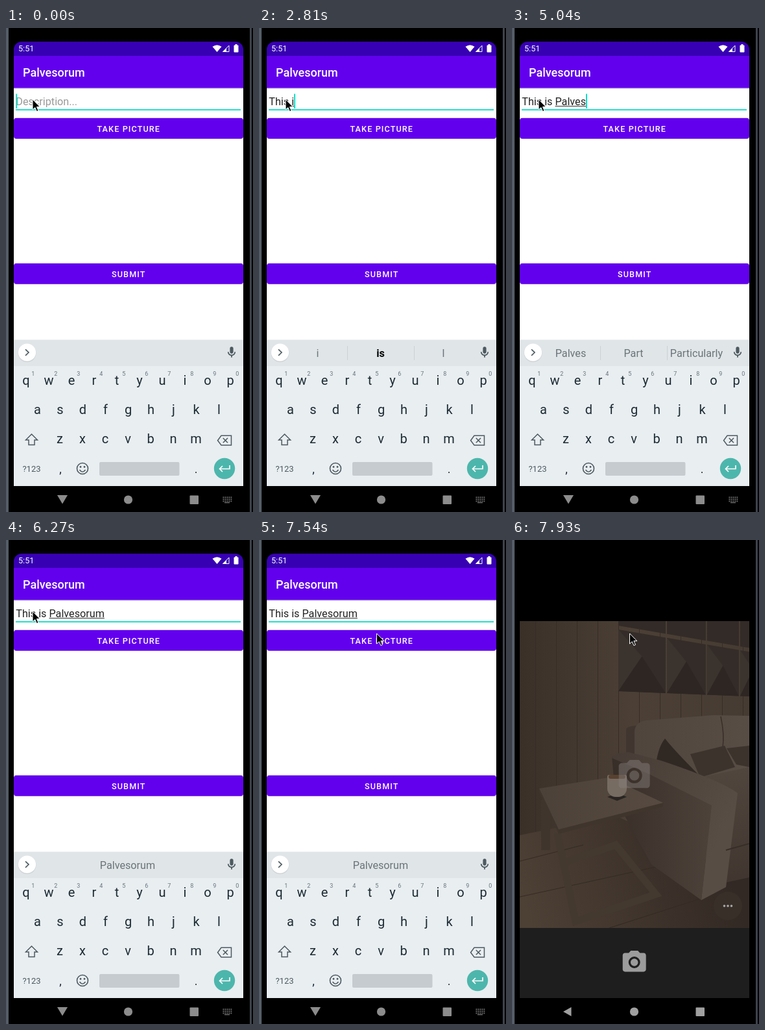
An HTML page with a canvas that plays this animation: 381x746 px, repeating every 8000 ms.

```html
<!DOCTYPE html>
<html lang="en">
<head>
<meta charset="utf-8">
<title>Phone typing</title>
<style>
html, body { margin: 0; height: 100%; overflow: hidden; background: #000; }
canvas { display: block; }
</style>
</head>
<body>
<canvas id="stage" width="381" height="746"></canvas>
<script>
const ctx = document.getElementById('stage').getContext('2d');
const LOOP = 8000, BLINK = 530;
const NAME = 'Palvesorum', SENTENCE = 'This is ' + NAME;

// When each letter of the sentence appears
const keyTimes = [1060, 1210, 1610, 1740, 1880, 2810, 2960, 2960, 3540, 3740, 3940, 4370, 4640, 5040, 5290, 5430, 5570, 5710];
const completions = { T: ['The', 'Thanks'], i: ['*is', 'I'], P: ['Part', 'Particularly'] };

const CAMERA = new Path2D('M9 2L7.17 4H4c-1.1 0-2 .9-2 2v12c0 1.1.9 2 2 2h16c1.1 0 2-.9 2-2V6c0-1.1-.9-2-2-2h-3.17L15 2zM12 17a5 5 0 1 1 0-10 5 5 0 1 1 0 10zM12 15.2a3.2 3.2 0 1 0 0-6.4 3.2 3.2 0 1 0 0 6.4z');
const MIC = new Path2D('M12 14c1.66 0 3-1.34 3-3V5a3 3 0 0 0-6 0v6c0 1.66 1.34 3 3 3zM17 11a5 5 0 0 1-10 0H5c0 3.5 2.6 6.4 6 6.9V21h2v-3.1c3.4-.5 6-3.4 6-6.9z');
const POINTER = new Path2D('M0 0V16L3.8 12.6 6.4 18.6 9 17.5 6.4 11.6H11.3Z');

function rect(x, y, w, h, color, radius = 0) {
  ctx.fillStyle = color;
  ctx.beginPath();
  ctx.roundRect(x, y, w, h, radius);
  ctx.fill();
}
function circle(x, y, r, color) {
  ctx.fillStyle = color;
  ctx.beginPath();
  ctx.arc(x, y, r, 0, 7);
  ctx.fill();
}
function shape(d, color) {
  ctx.fillStyle = color;
  ctx.fill(new Path2D(d));
}
function line(d, color, width = 1.6) {
  ctx.strokeStyle = color;
  ctx.lineWidth = width;
  ctx.stroke(new Path2D(d));
}
function fade(x0, y0, x1, y1, ...colors) {
  const gradient = ctx.createLinearGradient(x0, y0, x1, y1);
  colors.forEach((color, i) => gradient.addColorStop(i / (colors.length - 1), color));
  return gradient;
}
function icon(path, x, y, scale, color) {
  ctx.save();
  ctx.translate(x, y);
  ctx.scale(scale, scale);
  ctx.translate(-12, -12);
  ctx.fillStyle = color;
  ctx.fill(path, 'evenodd');
  ctx.restore();
}
function text(str, x, y, size, color, align = 'center', weight = 400, spacing = 0) {
  ctx.font = `${weight} ${size}px Roboto, sans-serif`;
  ctx.letterSpacing = spacing + 'px';
  ctx.textAlign = align;
  ctx.fillStyle = color;
  ctx.fillText(str, x, y);
}
function clipped(x, y, w, h, radius, paint) {
  ctx.save();
  ctx.beginPath();
  ctx.roundRect(x, y, w, h, radius);
  ctx.clip();
  paint();
  ctx.restore();
}

function button(label, y) {
  rect(12, y, 354, 32, '#6200ee', 4);
  text(label, 189.3, y + 21, 12.6, '#fff', 'center', 500, 1.125);
}

function suggest(typed, word) {
  if (!typed) return [];
  if (!word) return ['will', 'is', 'was'];
  return word.length > 6 ? [word] : [word, ...completions[word[0]]];
}

function suggestions(words) {
  const middle = (words.length - 1) / 2;
  words.forEach((word, i) => {
    const bold = word[0] == '*';
    text(word.replace('*', ''), 187.5 + 97 * (i - middle), 507, 16.2, bold ? '#000' : '#6a7478', 'center', bold ? 700 : 400);
    if (i) rect(39 + 97 * i + (i - 1) * 6, 490, 1, 22, '#ccd1d4');
  });
}

function keyRow(keys, x, y) {
  [...keys].forEach((key, i) => text(key, x + 35 * i, y, 20, '#1c2b33'));
}

function keyboard(words) {
  const ink = '#1c2b33', gray = '#4c5a60';
  rect(12, 480.5, 354, 41, '#e0e5e8');
  rect(12, 521, 354, 185, '#e9eef1');
  circle(32.5, 501, 14, '#cfd4d7');
  circle(32.5, 500, 13.6, '#fff');
  line('M30 495.3L35 500.1 30 504.9', gray);
  suggestions(words);
  icon(MIC, 348, 500, .87, gray);
  keyRow('qwertyuiop', 31, 549.5);
  keyRow('asdfghjkl', 48.5, 595);
  keyRow('zxcvbnm', 83, 640);
  for (let i = 0; i < 10; i++) text((i + 1) % 10, 41.8 + 35 * i, 535.5, 9, '#66747a');
  line('M39.5 626L30.5 635H35V642.5H44V635H48.5Z', gray, 1.5);
  line('M332 628.3H347.5V643H332L326.5 635.7ZM334.8 632L342 639.3M342 632L334.8 639.3', gray, 1.5);
  text('?123', 39.5, 683.7, 13, gray);
  text(',', 84, 685.5, 18, ink);
  text('.', 293, 685.5, 18, ink);
  line('M126.5 679a8.5 8.5 0 1 1-17 0a8.5 8.5 0 1 1 17 0M113.5 681Q118 687 122.5 681', gray);
  circle(115, 676.5, 1.4, gray);
  circle(121, 676.5, 1.4, gray);
  rect(144, 669, 123.5, 21, '#c6cbcf', 2);
  circle(337, 679, 16.2, '#4db6ac');
  line('M345 674V679.5H330M334 675L329.5 679.5 334 684', '#fff', 1.7);
}

function navigation(color, back) {
  shape(back ? 'M79 727L91.5 720V734Z' : 'M79 720H95L87 733.5Z', color);
  circle(188.5, 727, 6.6, color);
  rect(283.5, 720.5, 13.5, 13.5, color, 1);
  if (back) return;
  for (let i = 0; i < 15; i++) rect(334.5 + i % 5 * 3, 722.5 + (i / 5 | 0) * 3, 1.8, 1.8, '#777');
  rect(337, 731, 8, 1.2, '#777');
}

function statusBar() {
  rect(12, 21, 354, 22, '#3700b3', [12, 12, 0, 0]);
  text('5:51', 19, 36.3, 12.6, '#fff', 'left');
  shape('M325.5 37L318.5 28.8Q325.5 23.5 332.5 28.8ZM334 37L340 31V37Z', '#fff');
  line('M334.5 36.5H344V27Z', '#fff', 1);
  rect(351.5, 26.5, 7, 11, '#fff', 1);
  rect(353.5, 25, 3, 2, '#fff');
}

function form(t) {
  const count = keyTimes.filter(at => at <= t).length;
  const typed = SENTENCE.slice(0, count), word = typed.split(' ').pop();
  const lastKey = count ? keyTimes[count - 1] : -250;

  rect(12, 92, 354, 389, '#fff');
  rect(12, 92, 354, 2, '#ddd');
  rect(12, 42, 354, 50.6, '#6200ee');
  statusBar();
  text(NAME, 26, 75, 18, '#fff', 'left', 500);

  text(typed || 'Description...', 15.3, 119, 16.2, typed ? '#222' : '#999', 'left');
  const width = ctx.measureText(typed).width, marked = ctx.measureText(word).width;
  rect(15.3 + width - marked, 120, marked, 1, '#333');
  rect(15, 125.3, 347, 1.8, '#03dac5');
  if (Math.floor((t - lastKey) / BLINK) % 2 == 0) rect(15.3 + width, 101.5, 1.9, 22.5, '#03dac5');
  button('TAKE PICTURE', 138.7);
  button('SUBMIT', 362.7);
  keyboard(suggest(typed, word));
  navigation('#8c8c8c');
}

function launching() {
  clipped(12, 21, 354, 700, [12, 12, 0, 0], () => {
    rect(12, 21, 354, 700, '#1d1d1d');
    ctx.translate(189, 388);
    ctx.scale(1.05, 1.05);
    ctx.translate(-189, -388);
    keyboard([NAME]);
    rect(0, 0, 381, 746, 'rgba(29,29,29,.6)');
    rect(0, 690, 381, 56, 'rgba(0,0,0,.16)');
  });
  icon(CAMERA, 188.7, 363, 2.4, '#6b6d6e');
  navigation('#a0a0a0', true);
}

function wallTiles() {
  const top = x => 138 + (x - 164) * .17, bottom = x => 233 + (x - 164) * .04;
  for (let x = 164, w = 73; x < 366; x += w + 2, w *= .82) {
    const r = x + w, mid = `${x + w / 2} ${(top(x) + bottom(x)) / 2 - 6}`;
    shape(`M${x} 120H${r}V${top(r) - 6}L${x} ${top(x) - 6}Z`, '#332b27');
    shape(`M${x} ${top(x)}L${r} ${top(r)}V${bottom(r)}L${x} ${bottom(x)}Z`, '#342c28');
    shape(`M${x} ${top(x)}L${mid} ${x} ${bottom(x)}Z`, '#3b332d');
    shape(`M${x} ${bottom(x)}L${mid} ${r} ${bottom(r)}Z`, '#2d2623');
  }
}

function room() {
  rect(12, 125, 354, 473, fade(12, 0, 366, 0, '#3a3028', '#4c4036', '#463b32'));
  for (let x = 36; x < 366; x += 32) rect(x, 125, 1, 330, '#372d26');
  shape('M12 455L160 425 366 520V598H12Z', fade(30, 598, 330, 500, '#4d4035', '#332924'));
  line('M12 495L110 470M12 550L240 500M150 598L290 553', '#352b24', 1.2);
  wallTiles();
  // sofa
  shape('M176 292Q176 287 194 286V345L176 335Z', '#40362f');
  shape('M189 350V294Q191 280 208 278L310 270 366 271V380Z', fade(190, 0, 366, 0, '#4f453d', '#584d45'));
  line('M322 272Q328 300 325 320', '#3a3029');
  shape('M290 366L366 350V520L320 530Z', fade(0, 350, 0, 530, '#51463e', '#40362f'));
  shape('M236 306Q250 324 290 364L222 345Q226 318 236 306Z', '#302823');
  shape('M275 330L328 317 344 350 290 366ZM331 321L366 317V350L346 346Z', '#3c332d');
  shape('M154 334L215 360 308 407 292 555 215 500 160 400Z', fade(154, 0, 308, 0, '#382e28', '#4d423a'));
  shape('M154 336Q156 327 180 327L230 340Q320 370 348 390L330 535 292 555 308 409 210 360Z', fade(160, 330, 340, 420, '#473c35', '#584d44'));
  line('M330 478L366 468', '#372e28', 2);
  // table and cup
  line('M70 452L98 588 222 546 160 470 78 498', '#44392f', 11);
  line('M52 400V478', '#40352d', 14);
  shape('M42 383L72 446 233 405V411L72 453 42 389Z', '#40352d');
  shape('M42 383L150 366 233 405 72 446Z', fade(42, 0, 233, 0, '#4c4138', '#574b41'));
  shape('M147 396L163 390 177 396 162 402Z', '#292522');
  rect(147, 362, 30, 34, '#776c62', [3, 3, 13, 13]);
  rect(149, 362, 26, 6, '#58412f', 3);
}

function viewfinder() {
  clipped(12, 125, 354, 473, 0, room);
  icon(CAMERA, 188.7, 363, 2.4, 'rgba(135,130,126,.45)');
  circle(333, 564, 22, '#382f29');
  for (let i = -1; i < 2; i++) circle(333 + 5.5 * i, 564, 1.8, '#aaa');
  rect(12, 598, 354, 108, '#1e1e1e');
  icon(CAMERA, 188.7, 651, 1.8, '#9c9c9c');
  navigation('#a0a0a0', true);
}

function pointer(t) {
  const step = Math.floor((t - 6550) / 141) + 1;
  const p = Math.max(0, Math.min(1, step / 8)), ease = p * p * (3 - 2 * p);
  ctx.save();
  ctx.translate(41 + 140.5 * ease, 110 + 34 * ease);
  ctx.fillStyle = '#000';
  ctx.fill(POINTER);
  ctx.strokeStyle = '#fff';
  ctx.lineWidth = 1;
  ctx.stroke(POINTER);
  ctx.restore();
}

function draw(t) {
  rect(0, 0, 381, 746, '#000');
  rect(0, 0, 4, 746, '#555d68');
  rect(376, 0, 3, 746, '#3d434b');
  if (t < 7810) form(t);
  else if (t < 7930) launching();
  else viewfinder();
  pointer(t);
}

const start = performance.now();
(function frame() {
  draw((performance.now() - start) % LOOP);
  requestAnimationFrame(frame);
})();
</script>
</body>
</html>
```
